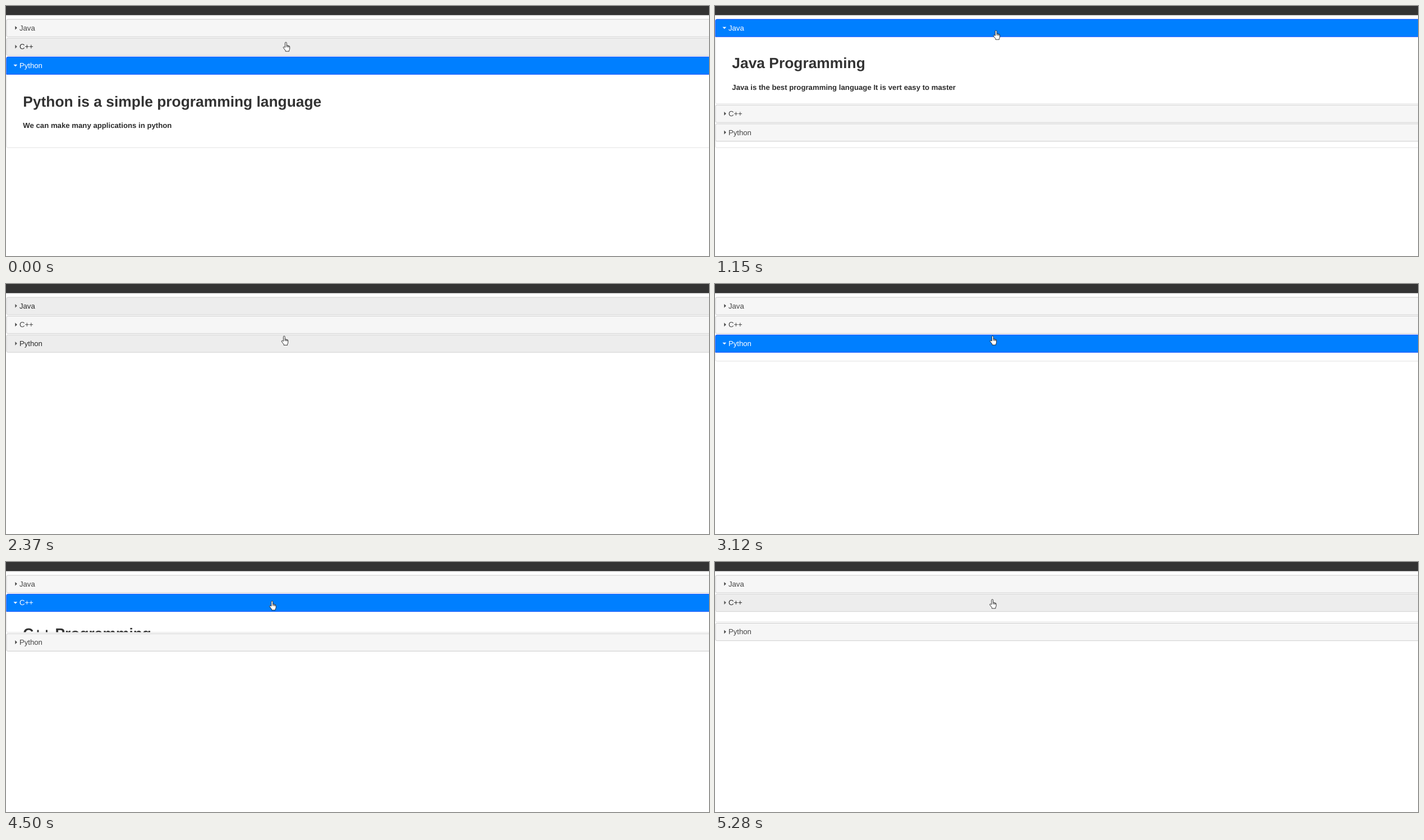
An HTML page for the animation above (5350 ms loop, 1253 by 447 pixels).

```html
<!DOCTYPE html>
<html lang="en">
<head>
<meta charset="utf-8">
<title>Accordion</title>
<style>
  html, body { margin: 0; width: 100%; height: 100%; overflow: hidden; background: #fff; }
  svg {
    display: block; width: 1253px; height: 447px;
    font-family: "Liberation Sans", Arial, sans-serif;
    text-rendering: geometricPrecision;
  }
  .label { font-size: 13.19px; }
  .title { font-size: 26.38px; font-weight: bold; fill: #333; }
  .note { font-size: 13.19px; font-weight: bold; fill: #2b2b2b; }
</style>
</head>
<body>
<svg id="stage" viewBox="0 0 1253 447"></svg>
<script>
const LOOP = 5350, SLIDE = 400;
const EM = 13.19, TOP = 23.4, HEAD = 32, PITCH = 33.6, PANEL = 131.1;

const sections = [
  ["Java", "Java Programming", "Java is the best programming language It is vert easy to master"],
  ["C++", "C++ Programming", "C++ is the best language for fast applications"],
  ["Python", "Python is a simple programming language", "We can make many applications in python"]
];

// [first, last, count] of evenly spaced picture updates
const bursts = [
  [70, 350, 5], [750, 1220, 8], [1820, 2310, 8], [3050, 3470, 7],
  [3940, 4430, 8], [4500, 4800, 5], [5000, 5280, 5]
];
const ticks = [0, 550, 1550, 2370, 2850, 3740];
for (const [a, b, n] of bursts)
  for (let i = 0; i < n; i++) ticks.push(a + (b - a) * i / (n - 1));
ticks.sort((a, b) => a - b);

// [time, section, opens]
const slides = [
  [762, 2, false], [762, 0, true], [1776, 0, false], [3030, 2, true],
  [3905, 2, false], [4357, 1, true], [4978, 1, false]
];
const focuses = [[0, -1], [750, 0], [2850, 2], [4357, 1]];
const presses = [[550, 750], [1550, 1820], [2850, 3050], [3740, 3940]];

// [time, x, y] of the fingertip
const moves = [
  [0, 499, 65], [350, 501, 44], [1960, 501, 44], [2310, 496, 94], [2370, 496, 93.3],
  [2850, 495, 93], [4080, 495, 93], [4400, 474.5, 70], [5000, 474.5, 70], [5280, 494.5, 67]
];

const looks = {
  plain: { fill: "#f6f6f6", stroke: "#c5c5c5", text: "#454545", icon: "#444" },
  hover: { fill: "#ededed", stroke: "#ccc", text: "#2b2b2b", icon: "#555" },
  active: { fill: "#007fff", stroke: "#003eff", text: "#fff", icon: "#fff" }
};

const stage = document.getElementById("stage");

function set(el, attrs) {
  for (const key in attrs) el.setAttribute(key, attrs[key]);
  return el;
}
function add(parent, tag, attrs, text) {
  const el = set(document.createElementNS("http://www.w3.org/2000/svg", tag), attrs);
  if (text) el.textContent = text;
  return parent.appendChild(el);
}
const shift = (x, y) => ({ transform: `translate(${x} ${y})` });

// header outline; an open header has square lower corners
function headPath(open) {
  const r = 2.4, foot = open ? 0 : r, low = HEAD - 0.4;
  return `M1300 .4H${0.9 + r}q${-r} 0 ${-r} ${r}V${low - foot}q0 ${foot} ${foot} ${foot}H1300z`;
}

add(stage, "rect", { width: 1253, height: 16.4, fill: "#333" });

const rows = sections.map(([label, title, note], i) => {
  const panel = add(stage, "g", {});
  const clip = add(add(panel, "clipPath", { id: "clip" + i }), "rect", { width: 1253 });
  const frame = add(panel, "path", { fill: "#fff", stroke: "#ddd", "stroke-width": 0.85 });
  const body = add(add(panel, "g", { "clip-path": `url(#clip${i})` }), "g", {});
  add(body, "text", { class: "title", x: 30.3, y: 57 }, title);
  add(body, "text", { class: "note", x: 30.3, y: 95.6 }, note);

  const head = add(stage, "g", {});
  const box = add(head, "path", { "stroke-width": 0.85 });
  const icon = add(head, "path", {});
  const text = add(head, "text", { class: "label", x: 23.9, y: 20.3 }, label);
  return { panel, clip, frame, body, head, box, icon, text };
});

const spot = add(stage, "circle", { r: 10, fill: "#dde838", "fill-opacity": 0.65 });
const hand = add(stage, "path", {
  d: "M-1.6 9V1.2a1.4 1.4 0 0 1 2.8 0V5.4q1-.7 2 .4q1.1-.5 1.8.6q1.7-.2 1.7 1.4V11q0 1.8-1.1 3.3V16H-1V14.4L-4.6 9.8q-.6-1.2.4-1.7q1-.3 1.7.6z" +
     "M1.2 5.4V8.6M3.2 5.8V8.8M5 6.4V9",
  fill: "#fff", stroke: "#111", "stroke-width": 0.85, "stroke-linejoin": "round"
});

const swing = p => 0.5 - Math.cos(Math.PI * Math.min(1, Math.max(0, p))) / 2;

function cursorAt(t) {
  const i = moves.findIndex(m => m[0] > t);
  if (i < 0) return moves[moves.length - 1].slice(1);
  const [t0, x0, y0] = moves[i - 1], [t1, x1, y1] = moves[i];
  const k = swing((t - t0) / (t1 - t0));
  return [x0 + (x1 - x0) * k, y0 + (y1 - y0) * k];
}

function panelAt(i, t) {
  let open = i === 2, part = open ? 1 : 0;
  for (const [at, section, opens] of slides) {
    if (section !== i || at > t) continue;
    const k = swing((t - at) / SLIDE);
    open = opens;
    part = opens ? k : 1 - k;
  }
  return { open, part };
}

function render(time) {
  const t = ticks.filter(k => k <= time + 0.01).pop();
  const [cx, cy] = cursorAt(t);
  const focus = focuses.filter(f => f[0] <= t).pop()[1];
  let y = TOP;

  rows.forEach((row, i) => {
    const { open, part } = panelAt(i, t);
    const over = cy >= y && cy <= y + HEAD;
    const look = looks[open ? "active" : over || focus === i ? "hover" : "plain"];
    set(row.head, shift(0, y));
    set(row.box, { fill: look.fill, stroke: look.stroke, d: headPath(open) });
    set(row.text, { fill: look.text });
    set(row.icon, { fill: look.icon, d: open ? "M13.4 14.2h6.8l-3.4 3.5z" : "M16.3 12.3v6.8l3.5-3.4z" });

    const h = PANEL * part;
    set(row.panel, { ...shift(0, y + HEAD), visibility: h > 0.5 ? "visible" : "hidden" });
    set(row.clip, { height: Math.max(0, h - 0.8) });
    const r = Math.min(2.4, h / 2);
    set(row.frame, { d: `M.9 -1V${h - 0.4 - r}q0 ${r} ${r} ${r}H1300V-1` });
    // the padding slides open together with the height
    set(row.body, shift(0, -EM * (1 - part)));
    y += PITCH + h;
  });

  const pressed = presses.some(([a, b]) => t >= a && t < b);
  set(spot, { cx, cy, visibility: pressed ? "visible" : "hidden" });
  set(hand, shift(cx, cy));
}

const begin = performance.now();
function loop() {
  render((performance.now() - begin) % LOOP);
  requestAnimationFrame(loop);
}
loop();
</script>
</body>
</html>
```
